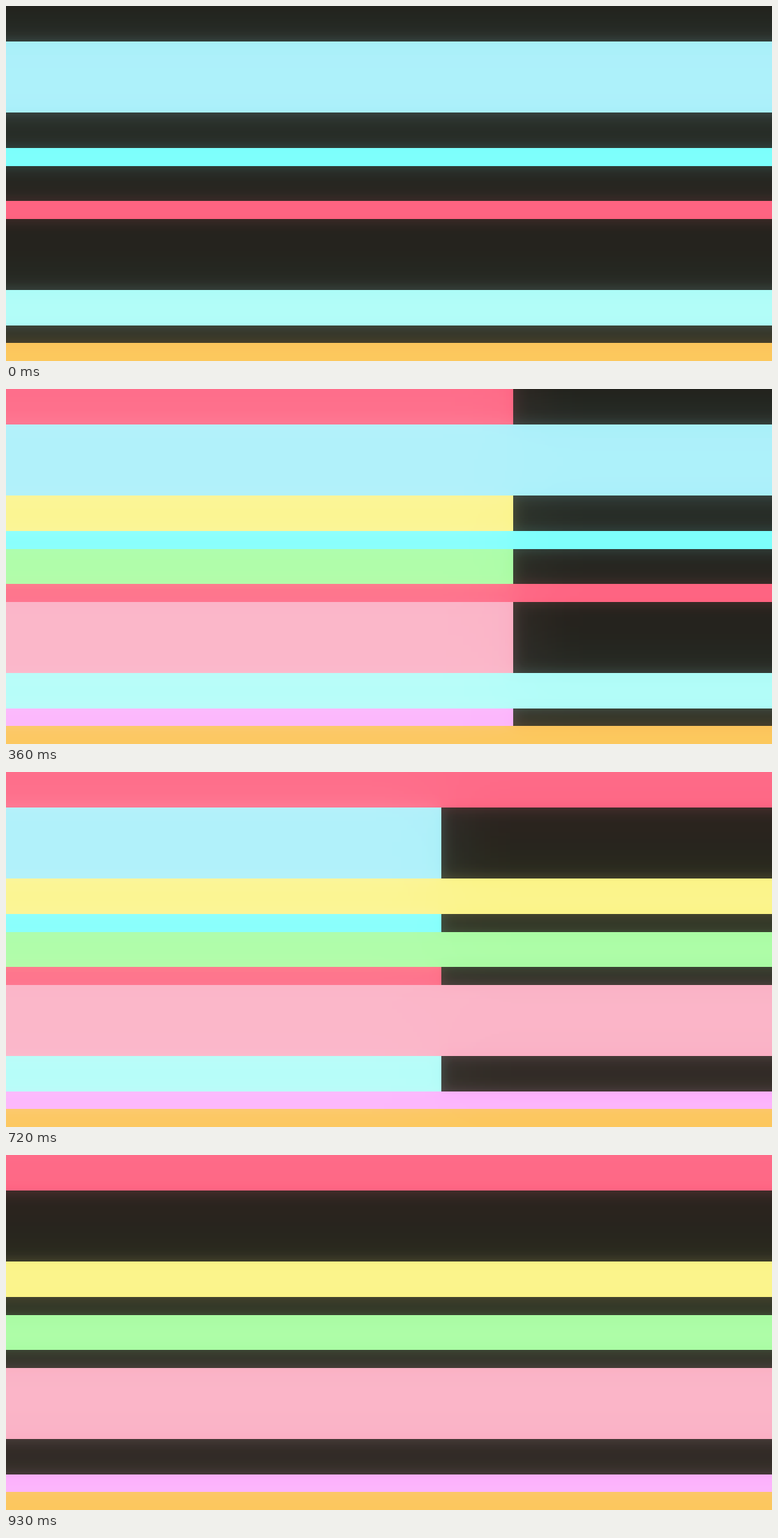
An HTML page with a canvas for the animation above (1270 ms loop, 1098x510 px).

```html
<!DOCTYPE html>
<html lang="en">
<head>
<meta charset="utf-8">
<title>Glowing stripes</title>
<style>
html, body { margin: 0; width: 100%; height: 100%; overflow: hidden; background: #1f1f19; }
canvas { display: block; width: 100%; height: 100%; }
</style>
</head>
<body>
<canvas id="stage" width="1098" height="510"></canvas>
<script>
const WIDTH = 1098, HEIGHT = 510, LOOP = 1270, STEP = 30;
const PAD = 160; // stripes run past the stage so the glow does not fade at its borders
const edges = [0, 51, 153, 204, 230, 280, 306, 408, 459, 484, 510];
const colors = [
  'rgb(254,90,118)', 'rgb(157,236,248)', 'rgb(250,241,124)', 'rgb(113,255,252)',
  'rgb(156,252,151)', 'rgb(254,89,118)', 'rgb(249,164,186)', 'rgb(163,252,246)',
  'rgb(251,164,251)', 'rgb(251,185,76)'
];
const last = colors.length - 1;
const glows = [{ radius: 10, strength: 0.18 }, { radius: 50, strength: 0.14 }];

const stage = document.getElementById('stage').getContext('2d');
const layer = document.createElement('canvas');
layer.width = WIDTH + 2 * PAD;
layer.height = HEIGHT + 2 * PAD;
const stripes = layer.getContext('2d');

// Gentle ease in and out: halfway between linear and sine
function ease(time, start, end) {
  const p = Math.min(1, Math.max(0, (time - start) / (end - start)));
  return (p + (1 - Math.cos(Math.PI * p)) / 2) / 2;
}

function drawStripe(index, part) {
  if (part <= 0) return;
  const top = index === 0 ? 0 : edges[index] + PAD;
  const bottom = index === last ? layer.height : edges[index + 1] + PAD;
  const right = part >= 1 ? layer.width : PAD + Math.round(WIDTH * part);
  stripes.fillStyle = colors[index];
  stripes.fillRect(0, top, right, bottom - top);
}

function draw(time) {
  const growing = ease(time, 159, 479);
  const shrinking = 1 - ease(time, 564, 913);

  stripes.clearRect(0, 0, layer.width, layer.height);
  colors.forEach((_, i) =>
    drawStripe(i, i === last ? 1 : i % 2 ? shrinking : growing));

  stage.fillStyle = '#1f1f19';
  stage.fillRect(0, 0, WIDTH, HEIGHT);
  stage.drawImage(layer, -PAD, -PAD);

  stage.save();
  stage.globalCompositeOperation = 'screen';
  for (const { radius, strength } of glows) {
    stage.filter = `blur(${radius}px)`;
    stage.globalAlpha = strength;
    stage.drawImage(layer, -PAD, -PAD);
  }
  stage.restore();
}

const began = performance.now();
let shown = -1;
function tick() {
  const elapsed = (performance.now() - began) % LOOP;
  const time = Math.floor(elapsed / STEP) * STEP;
  if (time !== shown) draw(shown = time);
  requestAnimationFrame(tick);
}
tick();
</script>
</body>
</html>
```
